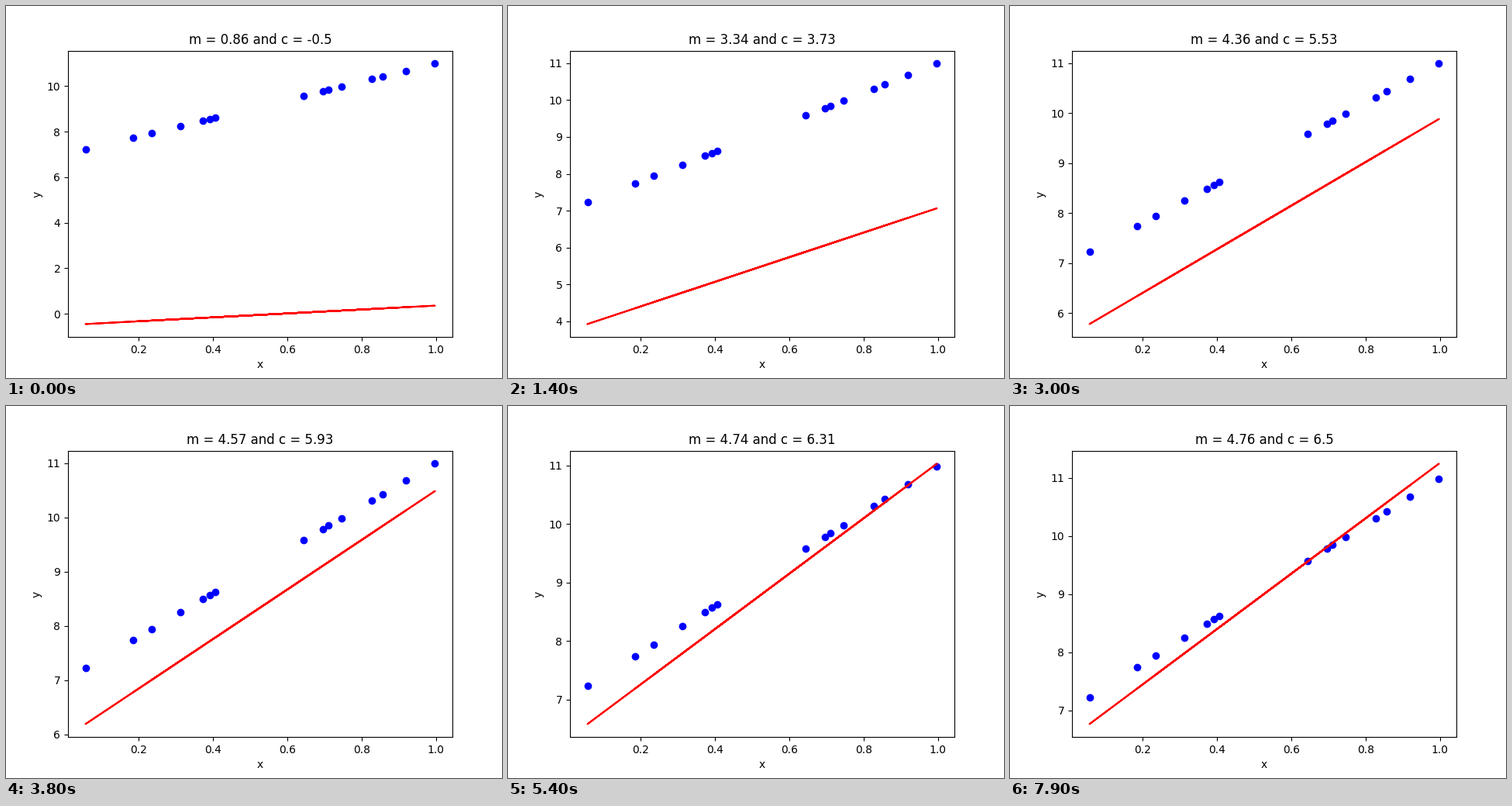
A matplotlib script for the animation above (8 s loop, 640 px wide and 480 px high).

```python
import random

import numpy as np
import matplotlib.pyplot as plt
from matplotlib.animation import FuncAnimation

FRAMES, INTERVAL = 80, 100
GOAL = np.array([4, 7])  # slope and intercept behind the samples
FAST, SLOW = 0.0672, 0.0031  # decay per step of the two error modes
START = np.array([0.86, -0.5])
SLOW_PART = np.array([1.0, -0.6])
FAST_PART = START - GOAL - SLOW_PART

xs = [0.057, 0.1858, 0.235, 0.3124, 0.3728, 0.3916, 0.406, 0.6443,
      0.6958, 0.7113, 0.7457, 0.827, 0.8572, 0.9194, 0.997]
random.Random(4).shuffle(xs)
x = np.array(xs)


def params(step):
    """Slope and intercept reached by gradient descent after `step` steps."""
    return (GOAL + FAST_PART * np.exp(-FAST * step)
            + SLOW_PART * np.exp(-SLOW * step))


fig, ax = plt.subplots(figsize=(6.4, 4.8), dpi=100)
ax.plot(x, GOAL[0] * x + GOAL[1], "bo")
line, = ax.plot(x, x, "r")
ax.set_xlabel("x")
ax.set_ylabel("y")


def update(step):
    m, c = params(step)
    line.set_ydata(m * x + c)
    ax.set_title(f"m = {round(m, 2)} and c = {round(c, 2)}")
    ax.relim()
    ax.autoscale_view()
    return line,


anim = FuncAnimation(fig, update, frames=FRAMES, interval=INTERVAL,
                     repeat=True, repeat_delay=0)
plt.show()
```
